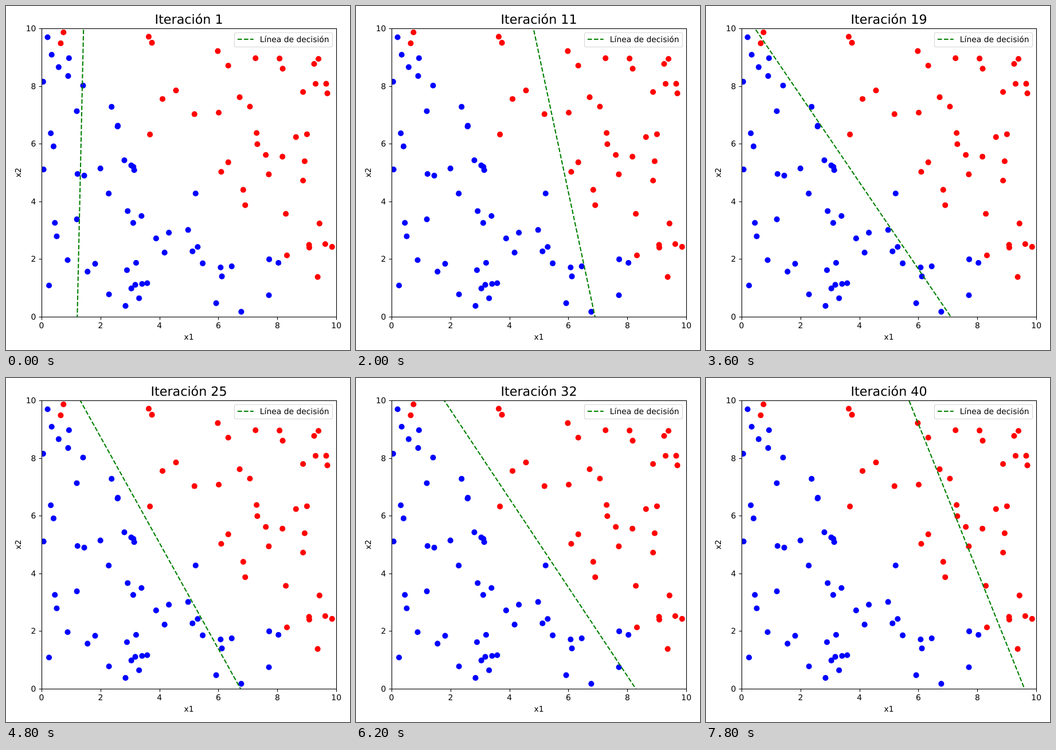
Recreate the animation shown at these times as an HTML page. Size 600 by 600 pixels, loop 8 s.

```html
<!DOCTYPE html>
<html lang="es">
<head>
<meta charset="utf-8">
<title>Línea de decisión</title>
<style>
html, body { margin: 0; width: 100%; height: 100%; overflow: hidden; background: #fff; }
svg { display: block; width: 100%; height: 100%; }
text { font-family: "DejaVu Sans", sans-serif; font-size: 13.89px; text-rendering: geometricPrecision; }
.mid { text-anchor: middle; }
.end { text-anchor: end; }
.axis { fill: none; stroke: #000; stroke-width: 1.11; }
.rule { stroke: #008000; stroke-width: 2.083; stroke-dasharray: 7.708 3.333; }
</style>
</head>
<body>
<svg viewBox="0 0 600 600">
  <clipPath id="area"><rect x="62" y="39.4" width="514.16" height="502.3"/></clipPath>
  <rect width="600" height="600" fill="#fff"/>
  <g clip-path="url(#area)">
    <g id="dots"></g>
    <line id="rule" class="rule"/>
  </g>
  <g id="ticks"></g>
  <rect class="axis" x="62.5" y="39.5" width="514" height="503"/>
  <text class="mid" x="319.1" y="582">x1</text>
  <text class="mid" transform="translate(26 290.6) rotate(-90)">x2</text>
  <text id="title" class="mid" x="319.1" y="31" style="font-size:22.22px"></text>
  <rect x="398.5" y="46.5" width="171" height="25" rx="2.78" fill="#fff" stroke="#ccc" stroke-width="1.11" opacity=".8"/>
  <line class="rule" x1="403.9" y1="58" x2="431.7" y2="58"/>
  <text x="442.8" y="63">Línea de decisión</text>
</svg>
<script>
const EPOCHS = 40, STEP = 200, RATE = 0.01;
const $ = id => document.getElementById(id);
const px = v => 62 + v * 51.416;
const py = v => 541.7 - v * 50.23;

function add(parent, tag, attrs, text = '') {
  const el = document.createElementNS('http://www.w3.org/2000/svg', tag);
  for (const k in attrs) el.setAttribute(k, attrs[k]);
  el.textContent = text;
  parent.appendChild(el);
}

// Mersenne Twister, 53-bit floats in [0, 1)
function twister(seed) {
  const N = 624, s = new Uint32Array(N);
  let i = N;
  s[0] = seed;
  for (let k = 1; k < N; k++) s[k] = Math.imul(1812433253, s[k - 1] ^ (s[k - 1] >>> 30)) + k;
  function next() {
    if (i === N) {
      for (let k = 0; k < N; k++) {
        const y = (s[k] & 0x80000000) | (s[(k + 1) % N] & 0x7fffffff);
        s[k] = s[(k + 397) % N] ^ (y >>> 1) ^ (y & 1 ? 0x9908b0df : 0);
      }
      i = 0;
    }
    let y = s[i++];
    y ^= y >>> 11;
    y ^= (y << 7) & 0x9d2c5680;
    y ^= (y << 15) & 0xefc60000;
    return (y ^ (y >>> 18)) >>> 0;
  }
  return () => {
    const hi = next() >>> 5, lo = next() >>> 6;
    return (hi * 67108864 + lo) / 9007199254740992;
  };
}

const rand = twister(42);
const points = Array.from({ length: 100 }, () => {
  const x = rand() * 10, y = rand() * 10;
  return { x, y, label: x + y > 10 ? 1 : 0 };
});

// Perceptron: one boundary per pass over the points
let w1 = rand(), w2 = rand(), bias = rand();
const lines = Array.from({ length: EPOCHS }, () => {
  for (const { x, y, label } of points) {
    const err = label - (w1 * x + w2 * y + bias >= 0 ? 1 : 0);
    w1 += RATE * err * x;
    w2 += RATE * err * y;
    bias += RATE * err;
  }
  return boundary(w1, w2, bias);
});

// Ends of the line for x in 0..10, cut at the figure's edge so dashes start there
function boundary(a, b, c) {
  const at = x => py(-(a * x + c) / b);
  const xa = px(0), ya = at(0), slope = (px(10) - xa) / (at(10) - ya);
  const cut = y => {
    const v = Math.max(-1, Math.min(601, y));
    return [xa + (v - ya) * slope, v];
  };
  return [...cut(ya), ...cut(at(10))];
}

for (const p of points)
  add($('dots'), 'circle', { cx: px(p.x), cy: py(p.y), r: 5.05, fill: p.label ? '#f00' : '#00f' });

for (let v = 0; v <= 10; v += 2) {
  const x = Math.round(px(v)) + 0.5, y = Math.round(py(v)) + 0.5;
  add($('ticks'), 'path', { class: 'axis', d: `M${x} 542.5v4.9M62.5 ${y}h-4.9` });
  add($('ticks'), 'text', { class: 'mid', x: px(v), y: 562 }, v);
  add($('ticks'), 'text', { class: 'end', x: 52.4, y: Math.round(py(v) + 5) }, v);
}

let shown = -1;
function draw(t) {
  const k = Math.floor(t / STEP) % EPOCHS;
  if (k !== shown) {
    shown = k;
    $('title').textContent = 'Iteración ' + (k + 1);
    ['x1', 'y1', 'x2', 'y2'].forEach((name, i) => $('rule').setAttribute(name, lines[k][i]));
  }
}

const start = performance.now();
function tick() {
  draw(performance.now() - start);
  requestAnimationFrame(tick);
}
tick();
</script>
</body>
</html>
```
